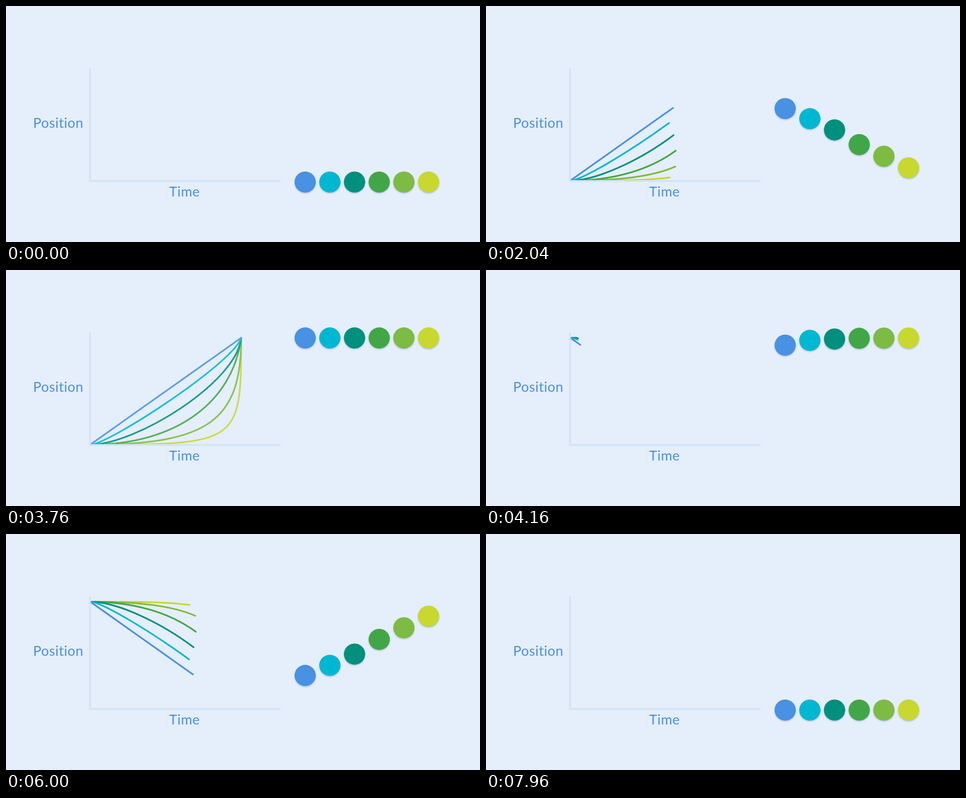
These frames come from a looping animation (1058 by 529 pixels, 8 s). An HTML page:

```html
<!DOCTYPE html>
<html lang="en">
<head>
<meta charset="utf-8">
<title>Easing curves</title>
<style>
  html, body { margin: 0; width: 100%; height: 100%; overflow: hidden; background: #e5eefb; }
  svg { display: block; width: 100vw; height: 100vh; }
  text { font: 30.5px Lato, "Open Sans", sans-serif; letter-spacing: .55px; fill: #4a90e2; text-anchor: middle; }
  .curve { fill: none; stroke-width: 3.7; stroke-linecap: round; }
  .axis { fill: none; stroke: #d2e4f7; stroke-width: 4; }
  .ball { filter: drop-shadow(0 2.6px 1.7px rgba(20, 70, 150, .27)); }
</style>
</head>
<body>
<svg viewBox="0 0 1058 529">
  <g id="rise"></g>
  <g id="fall"></g>
  <path class="axis" d="M187.5 140V392.2H613.5"/>
  <text x="116.6" y="273">Position</text>
  <text x="398.4" y="427">Time</text>
  <g id="balls"></g>
</svg>
<script>
const LOOP = 8000, STEP = 40, MOVE = 3000, TURN = 3960;
const FADE_START = 3720, FADE = 280;
const LEFT = 188, RIGHT = 525, TOP = 152, BOTTOM = 391.5;
const BALL_LOW = 394.6, BALL_HIGH = 152.3;
const LINEAR = [1 / 3, 1 / 3, 2 / 3, 2 / 3];

// Control points: graph shape, ball motion, drawing speed along the curve
const series = [
  { color: '#4891e3', shape: LINEAR, ball: LINEAR, draw: LINEAR },
  { color: '#00b7d2', shape: [.12, 0, .95, .765], ball: [.17, 0, .9, .79], draw: [.07, 0, .97, .86] },
  { color: '#00907d', shape: [.3, 0, .97, .58], ball: [.3, 0, .97, .727], draw: [.06, 0, 1, .83] },
  { color: '#41a746', shape: [.58, 0, .945, .41], ball: [.53, 0, .95, .59], draw: [.1, 0, 1, .76] },
  { color: '#7dbb42', shape: [.78, 0, 1, .22], ball: [.7, 0, 1, .53], draw: [.15, 0, 1, .66] },
  { color: '#c8d82e', shape: [.99, 0, 1, .01], ball: [.85, 0, .93, .28], draw: [.2, 0, 1, .55] }
];

const clamp = v => Math.min(1, Math.max(0, v));
const mix = (a, b, k) => a + (b - a) * k;
const cubic = (p, q, u) => 3 * p * u * (1 - u) ** 2 + 3 * q * u * u * (1 - u) + u ** 3;

function ease([x1, y1, x2, y2], t) {
  if (t <= 0 || t >= 1) return clamp(t);
  let lo = 0, hi = 1;
  for (let i = 0; i < 30; i++) {
    const mid = (lo + hi) / 2;
    if (cubic(x1, x2, mid) < t) lo = mid; else hi = mid;
  }
  return cubic(y1, y2, lo);
}

function add(parent, tag, attrs) {
  const el = document.createElementNS('http://www.w3.org/2000/svg', tag);
  for (const key in attrs) el.setAttribute(key, attrs[key]);
  return parent.appendChild(el);
}

function makeGraph(id, from, to) {
  const group = document.getElementById(id);
  const point = (x, y) => mix(LEFT, RIGHT, x) + ' ' + mix(from, to, y);
  // The first series lies on top
  const curves = [...series].reverse().map(({ color, shape: [x1, y1, x2, y2], draw }) => {
    const d = `M${point(0, 0)}C${point(x1, y1)} ${point(x2, y2)} ${point(1, 1)}`;
    const el = add(group, 'path', { class: 'curve', stroke: color, d });
    return { el, draw, length: el.getTotalLength() };
  });
  return t => {
    const opacity = t > 0 ? clamp(1 - (t - FADE_START) / FADE) : 0;
    group.setAttribute('opacity', opacity);
    if (!opacity) return;
    for (const { el, draw, length } of curves) {
      const shown = ease(draw, t / MOVE) * length;
      el.setAttribute('stroke-dasharray', t < MOVE ? `${shown} ${length + 9}` : 'none');
    }
  };
}

const drawRise = makeGraph('rise', BOTTOM, TOP);
const drawFall = makeGraph('fall', TOP - .2, BOTTOM - .2);
const ballLayer = document.getElementById('balls');
const balls = series.map(({ color }, i) =>
  add(ballLayer, 'circle', { class: 'ball', cx: 667.8 + i * 55.08, r: 23.7, fill: color }));

function render(time) {
  const t = Math.floor(time % LOOP / STEP) * STEP;
  const falling = t >= TURN;
  const k = (falling ? t - TURN : t) / MOVE;
  drawRise(t);
  drawFall(t - TURN);
  balls.forEach((ball, i) => {
    const p = ease(series[i].ball, k);
    ball.setAttribute('cy', mix(BALL_LOW, BALL_HIGH, falling ? 1 - p : p));
  });
}

const start = performance.now();
function tick() {
  render(performance.now() - start);
  requestAnimationFrame(tick);
}
tick();
</script>
</body>
</html>
```
